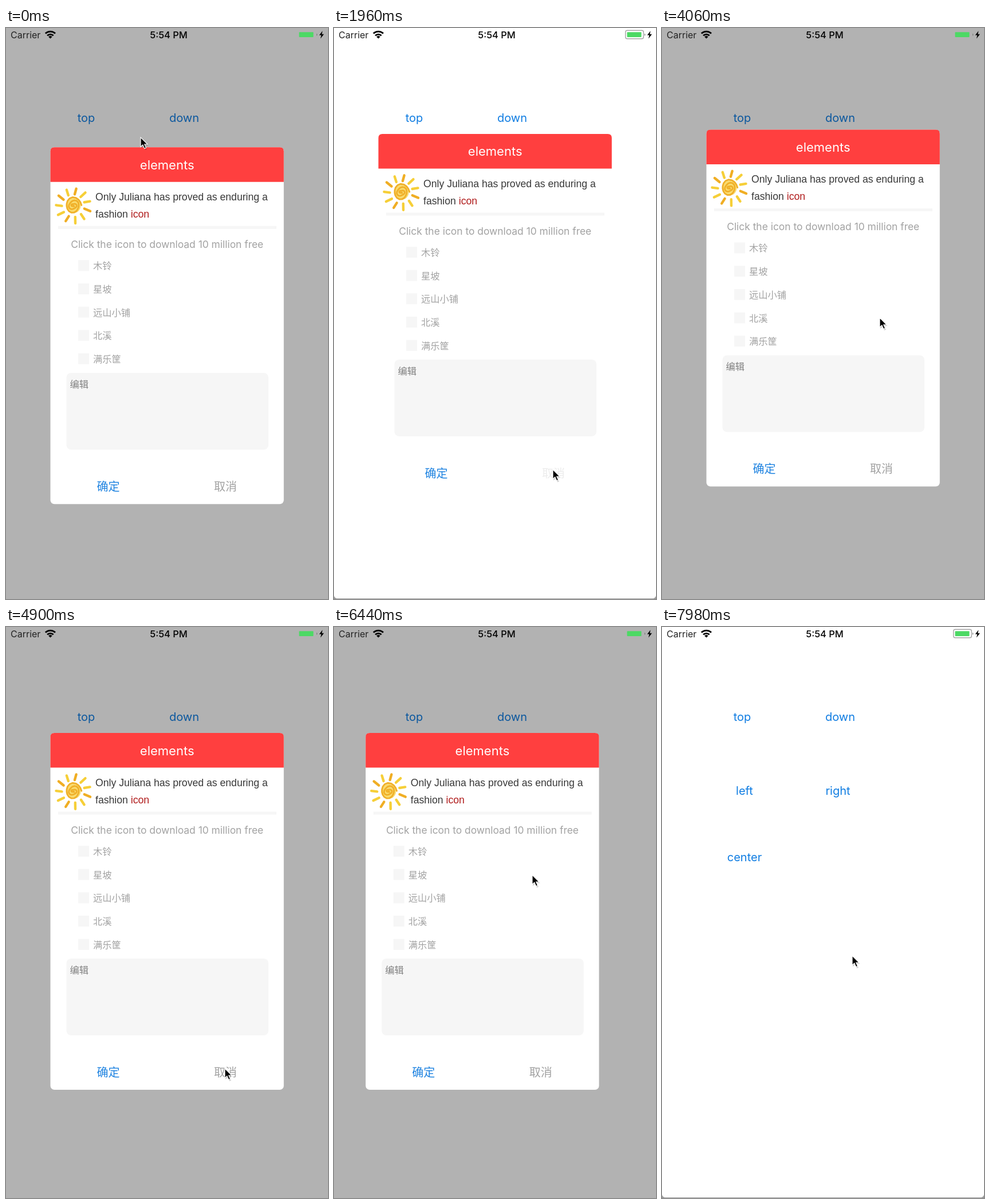
Animation, 562 px wide and 997 px high, one loop 8 s. Source, as an HTML page:

```html
<!DOCTYPE html>
<html lang="en">
<head>
<meta charset="utf-8">
<title>Popup dialog</title>
<style>
  html, body { margin: 0; width: 100%; height: 100%; overflow: hidden; background: #fff; }
  svg { display: block; width: 562px; height: 997px; }
  text { font-family: Inter, "Noto Sans CJK SC", "Noto Sans CJK", sans-serif; }
  .link { font-size: 20px; fill: #107de2; }
  .story text { font: 17.64px "Liberation Sans", Arial, sans-serif; fill: #383838; }
  .story .accent { fill: #b01c1c; }
  .muted { fill: #a2a2a2; }
  .cjk { font-family: "Noto Sans CJK SC", "Noto Sans CJK", sans-serif; font-size: 16.3px; }
  .action { font-size: 20px; }
  .mid { text-anchor: middle; }
</style>
</head>
<body>
<svg viewBox="0 0 562 997" xmlns="http://www.w3.org/2000/svg">
  <rect width="562" height="997" fill="#fff"/>
  <g class="link mid">
    <text x="140" y="164">top</text>
    <text id="down" x="311" y="164">down</text>
    <text x="144" y="293">left</text>
    <text id="right" x="307" y="293">right</text>
    <text x="144" y="409">center</text>
  </g>
  <path id="edge" d="M0 991q1 5 6 5H556q5 0 6-5V997H0z" fill="#999"/>
  <rect id="shade" width="562" height="997" fill="#000" opacity=".302"/>

  <g id="dialog">
    <rect width="407.3" height="623" rx="7" fill="#fff"/>
    <path d="M0 60.5V7q0-7 7-7H400.3q7 0 7 7V60.500z" fill="#ff3f3f"/>
    <text class="mid" x="203.700" y="38.500" font-size="22" fill="#fff">elements</text>
    <g id="sun" transform="translate(40 102)" fill="none" stroke-linecap="round"></g>
    <g class="story">
      <text x="78.500" y="93">Only Juliana has proved as enduring a</text>
      <text x="78.500" y="123">fashion <tspan class="accent">icon</tspan></text>
    </g>
    <rect x="13.500" y="137.500" width="381" height="5" fill="#f6f6f6"/>
    <text class="muted mid" x="203.700" y="176" font-size="17.4">Click the icon to download 10 million free</text>
    <g id="options"></g>
    <rect x="28" y="394" width="352.500" height="134" rx="8" fill="#f6f6f6"/>
    <text class="cjk" x="34" y="420" fill="#808080">编辑</text>
    <text class="cjk action mid" x="101" y="600" fill="#1d82e0">确定</text>
    <text id="cancel" class="cjk action mid muted" x="305.500" y="600">取消</text>
  </g>

  <g>
    <text x="8" y="18" font-size="16" fill="#222">Carrier</text>
    <text class="mid" x="284" y="17.500" font-size="16.4" font-weight="500">5:54 PM</text>
    <g fill="none" stroke="#000" stroke-width="2.8">
      <path d="M68.800 9.600a12.400 12.400 0 0 1 17.200 0"/>
      <path d="M72.100 13.200a7.600 7.600 0 0 1 10.600 0"/>
    </g>
    <path d="M77.400 18.600l-3.300-3.400a4.800 4.800 0 0 1 6.600 0z"/>
    <rect id="battery" x="508.700" y="4.200" width="31.600" height="14.600" rx="3" fill="#fff" stroke="#a5a5a5" stroke-width="1.4"/>
    <rect x="511.500" y="7.300" width="25" height="8.800" rx="1" fill="#4cd964"/>
    <path d="M542 9.500q2.600 2 0 4.500z" fill="#777"/>
    <path d="M552.500 5l-5.800 7.600h3.600l-1.400 6 6-7.800h-3.700z"/>
  </g>

  <g id="cursor">
    <path d="M1 2v17l4-3.600 3 6.600 3-1.300-2.800-6.500h5.500z" fill="#000" opacity=".18"/>
    <path d="M0 0v16.500l3.800-3.500 2.900 6.500 2.800-1.200-2.800-6.300h5.300z" stroke="#fff" stroke-width="1.1"/>
  </g>
</svg>
<script>
const $ = id => document.getElementById(id);
const LOOP = 8000, HOME = { x: 77.5, y: 185 };

// Offsets are the distance from the resting place to just outside the stage.
const popups = [
  { open: -240, close: 1960, dx: 0, dy: -808 },
  { open: 3625, close: 5040, dx: 0, dy: 812, button: "down" },
  { open: 6150, close: 7400, dx: 484, dy: 0, button: "right" }
];

const cursorPath = [
  [0, 235, 191], [200, 240, 215], [1000, 390, 822], [1500, 382, 771], [2320, 382, 771],
  [3250, 318, 160], [3660, 318, 160], [4060, 380, 506], [4600, 382, 771], [5280, 382, 771],
  [5860, 307, 296], [6200, 307, 296], [6440, 346, 433], [7000, 380, 771], [7700, 380, 771],
  [7840, 375, 714], [7980, 332, 574]
];

const smooth = p => p * p * (3 - 2 * p);
const show = (id, visible) => $(id).setAttribute("visibility", visible ? "visible" : "hidden");
const place = (id, x, y) => $(id).setAttribute("transform", `translate(${x} ${y})`);
const polar = (r, a) => `${(r * Math.cos(a)).toFixed(1)} ${(r * Math.sin(a)).toFixed(1)}`;

// Remaining share of the distance for an underdamped spring.
function spring(ms) {
  const damping = 0.7, omega = 15.2, root = Math.sqrt(1 - damping ** 2);
  const s = ms / 1000, a = omega * root * s;
  return Math.exp(-damping * omega * s) * (Math.cos(a) + damping / root * Math.sin(a));
}

function cursorAt(t) {
  const next = cursorPath.findIndex(k => k[0] > t);
  if (next < 0) return cursorPath.at(-1).slice(1);
  const [t0, x0, y0] = cursorPath[next - 1], [t1, x1, y1] = cursorPath[next];
  const p = smooth((t - t0) / (t1 - t0));
  return [x0 + (x1 - x0) * p, y0 + (y1 - y0) * p];
}

function buildSun() {
  let marks = "";
  for (let i = 0; i < 11; i++) {
    const a = (i * 360 / 11 - 83) * Math.PI / 180;
    const color = i % 3 ? "#f6cf38" : "#f0ae24";
    marks += `<path d="M${polar(20, a)}L${polar(30 + i % 2, a + 0.05)}" stroke="${color}" stroke-width="4.4"/>`;
  }
  let swirl = "M0 0";
  for (let a = 0; a < 19; a += 0.4) swirl += "L" + polar(a * 0.8 + Math.sin(a * 2.3), a);
  $("sun").innerHTML = marks +
    `<circle r="13" fill="#f9dc70"/><path d="${swirl}" stroke="#f0b02a" stroke-width="2.8"/>`;
}

function buildOptions() {
  $("options").innerHTML = ["木铃", "星坡", "远山小铺", "北溪", "满乐筐"].map((name, i) => {
    const y = 197 + i * 40.7;
    return `<rect x="48.5" y="${y}" width="19" height="19" fill="#f6f6f6"/>
      <text class="cjk muted" x="74.5" y="${y + 16}">${name}</text>`;
  }).join("");
}

function render(t) {
  const popup = popups.find(p => t >= p.open && t < p.close + 250);
  const shaded = !!popup && t < popup.close;
  show("dialog", popup);
  show("shade", shaded);
  show("edge", !shaded);
  show("battery", !shaded);
  if (popup) {
    const away = shaded ? spring(t - popup.open) : smooth((t - popup.close) / 250);
    place("dialog", HOME.x + popup.dx * away, HOME.y + popup.dy * away);
    $("cancel").setAttribute("opacity", t > popup.close - 110 ? 0.2 : 1);
  }
  for (const { open, button } of popups) {
    if (button) $(button).setAttribute("opacity", t > open - 200 && t < open ? 0.2 : 1);
  }
  place("cursor", ...cursorAt(t));
}

buildSun();
buildOptions();
const start = performance.now();
function tick() {
  render((performance.now() - start) % LOOP);
  requestAnimationFrame(tick);
}
tick();
</script>
</body>
</html>
```
